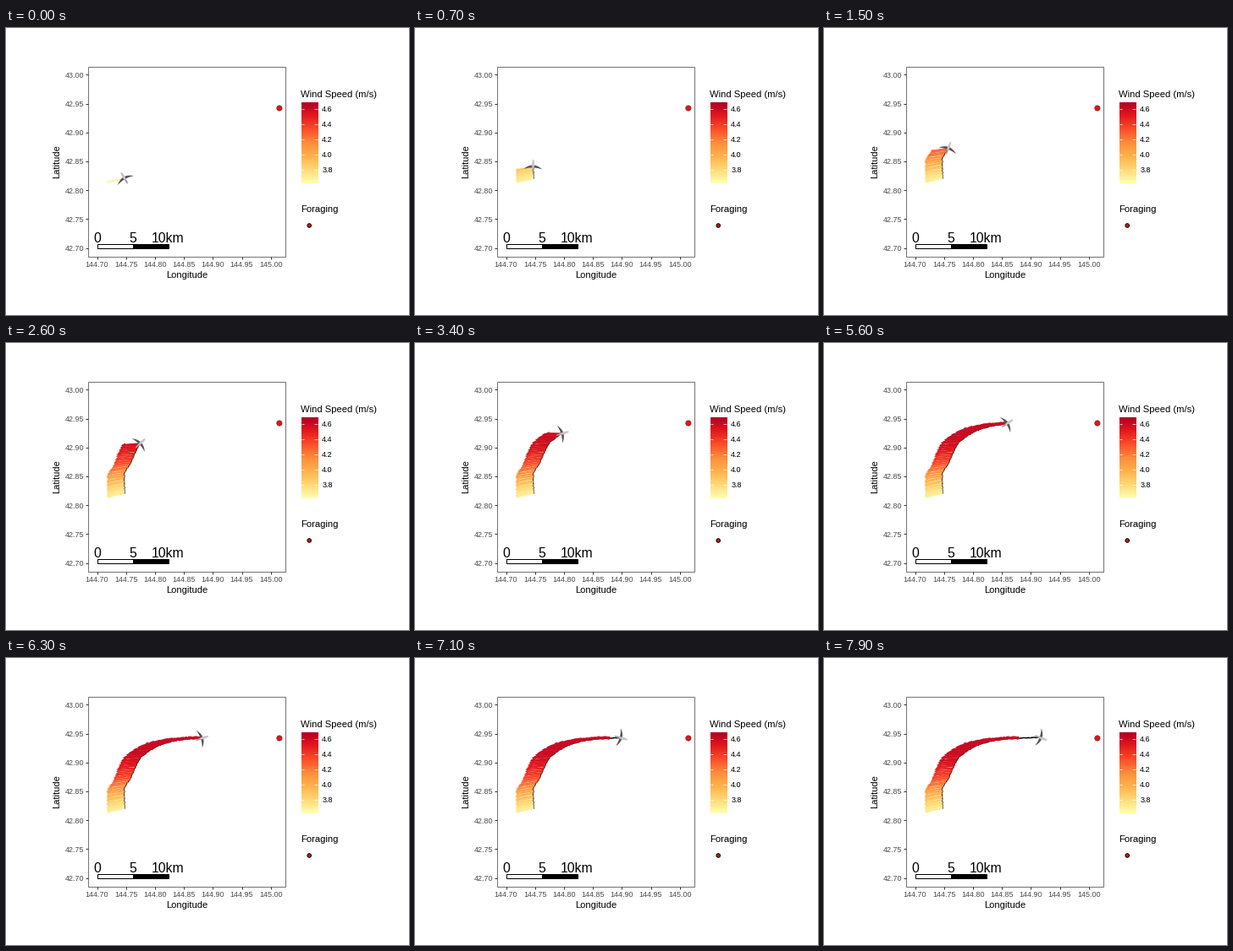
Write a matplotlib script that moves like this. It is 476 px wide and 340 px high and loops after 8 s.

```python
import numpy as np
import matplotlib.pyplot as plt
from matplotlib.animation import FuncAnimation
from matplotlib.collections import LineCollection, PolyCollection
from matplotlib.colors import LinearSegmentedColormap, Normalize
from matplotlib.patches import Circle, Rectangle

W, H, DPI = 476, 340, 100
PX = 72 / DPI  # points per pixel
FRAMES, INTERVAL = 160, 50
STEP = 0.06  # seconds of flight per drawn step
LAST_WIND_STEP = 105

plt.rcParams["font.family"] = "Liberation Sans"
fig = plt.figure(figsize=(W / DPI, H / DPI), dpi=DPI, facecolor="white")
ax = fig.add_axes([0, 0, 1, 1])
ax.axis("off")

heat = LinearSegmentedColormap.from_list(
    "heat", ["#ffffb2", "#fed976", "#feb24c", "#fd8d3c", "#fc4e2a", "#e31a1c", "#b10026"])
wind_norm = Normalize(3.61, 4.68)


def label(x, y, text, size, color="black", ha="center"):
    ax.text(x, y, text, fontsize=size * PX, color=color, ha=ha,
            va="center_baseline")


def line(x, y, color, width=1):
    ax.plot(x, y, color=color, lw=width * PX, solid_capstyle="butt")


def draw_map():
    ax.add_patch(Rectangle((97.5, 46), 232.5, 225, fill=False,
                           ec="#7a7a7a", lw=1.1 * PX))
    for i in range(7):
        x, y = 108 + 34.2 * i, 261 - 34.2 * i
        line([x, x], [271, 274], "#333333")
        line([94.5, 97.5], [y, y], "#333333")
        label(x, 280.3, f"{144.70 + 0.05 * i:.2f}", 9, "#4d4d4d")
        label(92.5, y, f"{42.70 + 0.05 * i:.2f}", 9, "#4d4d4d", "right")
    label(214, 293, "Longitude", 11.1)
    ax.text(61, 158.5, "Latitude", fontsize=11.1 * PX, rotation=90,
            ha="center", va="center")
    for i, (fill, text) in enumerate((("white", "0"), ("black", "5"), (None, "10km"))):
        x = 108 + 42 * i
        label(x, 248.5, text, 15.8)
        if fill:
            ax.add_patch(Rectangle((x, 256.7), 42, 4.6, fc=fill, ec="black", lw=PX))
    ax.add_patch(Circle((323.4, 95.5), 3.1, fc="#d7191c", ec="#a01818", lw=0.8 * PX))


def draw_legend():
    label(349, 78.5, "Wind Speed (m/s)", 11.2, ha="left")
    ax.imshow(np.linspace(1, 0, 192)[:, None], cmap=heat, aspect="auto",
              extent=(349, 368.5, 185, 89), interpolation="bilinear")
    for i in range(5):
        y = 168 - 17.9 * i
        line([349, 352.9], [y, y], "white", 0.7)
        line([364.6, 368.5], [y, y], "white", 0.7)
        label(373.8, y, f"{3.8 + 0.2 * i:.1f}", 9.2, ha="left")
    label(349, 214.5, "Foraging", 11.2, ha="left")
    ax.add_patch(Circle((358.7, 234.5), 2.3, fc="#c8161c", ec="black", lw=0.9 * PX))


def smoothstep(x):
    x = np.clip(x, 0, 1)
    return x * x * (3 - 2 * x)


rng = np.random.default_rng(4)
t = STEP * np.arange((5 * (FRAMES - 1) + 2) // 6 + 1)

# North first, then a turn to the east along a levelling curve.
track = np.column_stack([
    np.interp(t, [0, 1.1, 1.5, 2.6, 4.2, 6.3, 7.9],
              [140, 140, 147, 159, 188, 232, 256]),
    94.5 + 84 * np.exp(-(t / 2.27) ** 1.5)])
track += rng.uniform(-0.5, 0.5, track.shape)

wind = np.column_stack([-21 + 16 * smoothstep((t - 2.6) / 3.7),
                        np.maximum(5 - 1.6 * t, -1.5)])
wind[:, 1] += rng.uniform(-0.9, 0.9, len(t))
speed = 3.68 + 0.92 * (1 - np.exp(-(t / 1.45) ** 2))
colors = heat(wind_norm(speed))

# Heading turns from north-west to east with a growing sway.
heading = np.radians(120 * np.exp(-t / 2.4)
                     + 4 * t * np.cos(2 * np.pi * (t - 5.6) / 3.8))

tips = track + wind
unit = wind / np.linalg.norm(wind, axis=1, keepdims=True)
normal = unit[:, ::-1] * (1, -1)
base = tips - 4 * unit
shafts = np.stack([track, base], axis=1)
heads = np.stack([tips, base + 2 * normal, base - 2 * normal], axis=1)


def ellipse(center, length, width):
    a = np.linspace(0, 2 * np.pi, 24)
    return np.column_stack([center + length * np.cos(a), width * np.sin(a)])


def wings(span):
    v = np.linspace(-span, span, 21)
    front, back = 1.8 - 0.04 * v ** 2, -1.2 - 0.015 * v ** 2
    return np.column_stack([np.r_[front, back[::-1]], np.r_[v, v[::-1]]])


# Bird parts point forward along their first coordinate.
BIRD = [(ellipse(-3, 4.5, 1.1), "#a09c9f"),
        (wings(11), "#555357"),
        (ellipse(3, 5.5, 1.5), "#cdc5c9")]

draw_map()
draw_legend()
ax.set(xlim=(0.5, W + 0.5), ylim=(H + 0.5, 0.5))
track_art, = ax.plot([], [], color="black", lw=1.4 * PX, zorder=3)
shaft_art = ax.add_collection(LineCollection([], linewidths=1.8 * PX, zorder=4))
head_art = ax.add_collection(PolyCollection([], linewidths=0, zorder=4))
bird_art = ax.add_collection(PolyCollection(
    [], facecolors=[c for _, c in BIRD], linewidths=0, zorder=5))


def bird_parts(k):
    c, s = np.cos(heading[k]), np.sin(heading[k])
    turn = np.array([[c, -s], [-s, -c]])
    return [shape @ turn + track[k] for shape, _ in BIRD]


def update(frame):
    k = (5 * frame + 2) // 6  # 60 ms steps shown on a 50 ms clock
    n = min(k, LAST_WIND_STEP) + 1
    shaft_art.set_segments(shafts[:n])
    shaft_art.set_color(colors[:n])
    head_art.set_verts(heads[:n])
    head_art.set_facecolor(colors[:n])
    track_art.set_data(track[:k + 1, 0], track[:k + 1, 1])
    bird_art.set_verts(bird_parts(k))
    return track_art, shaft_art, head_art, bird_art


anim = FuncAnimation(fig, update, frames=FRAMES, interval=INTERVAL,
                     repeat=True, repeat_delay=0)
plt.show()
```
